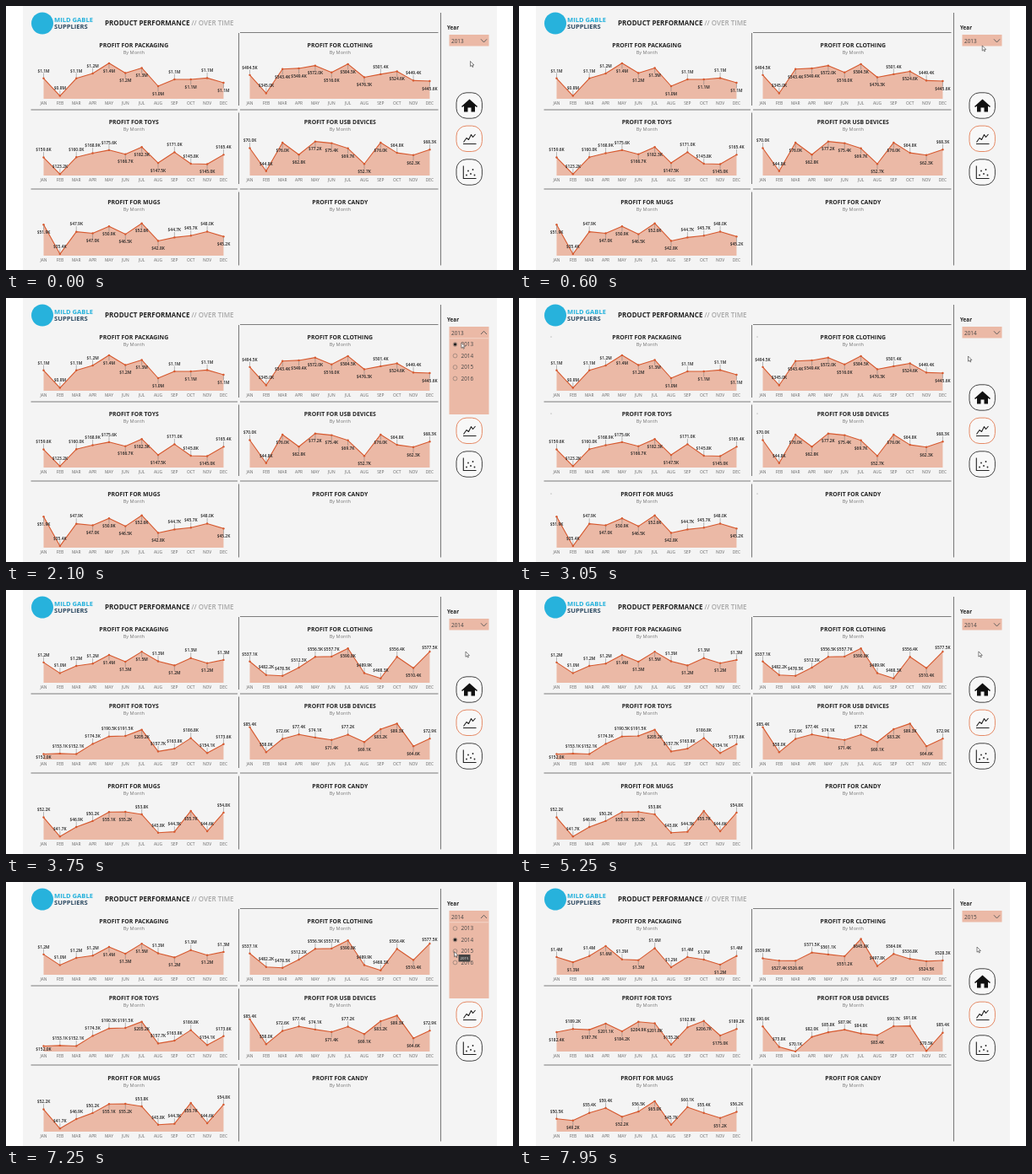
An HTML page that plays this animation: 600 px wide and 313 px high, repeating every 8000 ms.

```html
<!DOCTYPE html>
<html lang="en">
<head>
<meta charset="utf-8">
<title>Product performance</title>
<style>
html, body { margin: 0; width: 100%; height: 100%; overflow: hidden; background: #fff; }
svg { display: block; width: 100vw; height: 100vh; font-family: "Open Sans", "Noto Sans", sans-serif; }
.b { font-weight: 700; }
.mid { text-anchor: middle; }
.val { font-size: 4.9px; font-weight: 600; fill: #222; text-anchor: middle; }
.axis { font-size: 4.9px; fill: #666; text-anchor: middle; }
.icon { fill: none; stroke: #222; stroke-width: 1.1; stroke-linejoin: round; }
</style>
</head>
<body>
<svg id="stage" viewBox="0 0 600 313"></svg>
<script>
const LOOP = 8000;
const FILL = '#ebb9a6', LINE = '#d6592f', RULE = '#7d7d7d', INK = '#222';
const MONTHS = 'JAN FEB MAR APR MAY JUN JUL AUG SEP OCT NOV DEC'.split(' ');
const NAMES = ['PACKAGING', 'CLOTHING', 'TOYS', 'USB DEVICES', 'MUGS', 'CANDY'];
const ROWS = [0, 91, 186];
const X0 = 44.5, STEP = 19.36, COL = 244, BASE = 110, HEIGHT = 43.4;

// One row per chart: axis low, axis high, monthly values. A negative value puts its label below.
const Y2013 = [
  [.75, 1.45, 1.14, .806, 1.14, 1.235, -1.43, -1.243, -1.34, -.992, 1.12, -1.12, 1.147, -1.057],
  [300, 600, 494.5, 345, -543.4, -549.4, -572, -516, -584.5, -476.3, 501.4, -524.6, 449.4, -445.6],
  [120, 200, 159.6, 123.2, 160, 168.9, 175.6, -166.7, -182.3, -147.5, 171, 145.8, -145, 165.4],
  [40, 80, 70, 44.8, -76, -62.8, -77.2, -75.4, -69.7, -52.7, -76, 64.8, -62.3, 68.3],
  [34.5, 55, -51.9, 35.4, 47.9, -47, -50.9, -46.5, -52.6, -42.8, 44.7, 45.7, 48, -45.2]
];
const Y2014 = [
  [.8, 1.6, 1.245, 1.01, 1.17, 1.22, -1.41, -1.26, -1.48, 1.27, -1.18, 1.34, -1.23, 1.3],
  [450, 600, 537.1, 482.2, 478.5, 512.3, 556.5, 557.7, -590.8, 489.9, 468.3, 556.4, -510.4, 577.5],
  [140, 220, -152, 153.1, 152.1, 174.3, 190.5, 191.5, -205.2, 157.7, 163.8, 186.8, 154.1, 173.6],
  [50, 90, 85.4, 58, 72.6, 77.4, 74.1, -71.4, 77.2, -69.1, -83.2, -89.3, -64.6, 72.9],
  [40, 60, 52.2, 41.7, 46.9, 50.2, -55.1, -55.2, 53.8, 43.8, 44.3, -55.7, 44.6, 54.8]
];
const Y2015 = [
  [1.05, 1.75, 1.39, -1.29, 1.41, -1.6, 1.345, -1.33, 1.56, 1.195, 1.39, 1.34, -1.245, 1.41],
  [450, 650, 539.9, -527.4, -526.6, 571.5, 561.1, -551.2, -645.8, 497.8, 564, 536.8, -524.5, 528.3],
  [140, 220, -182.4, 189.2, -187.7, -201.1, -184.2, -204.9, -201.8, 155.2, 192.8, -206.7, -175, 189.2],
  [70, 100, 90.6, 73.8, 70.1, 82, 85.8, 87.9, 84.8, -83.4, 90.7, 91, 70.5, 85.4],
  [40, 70, 50.5, -49.2, 55.4, 59.4, -52.2, 56.5, -65, 45.7, 60.1, 55.4, -51.2, 56.2]
];
const YEARS = [Y2013, Y2014, Y2015];

// Year choices: the click, then the charts follow.
const PICKS = [
  { click: 2750, from: 3200, to: 3450 },
  { click: 7450, from: 7650, to: 7880 }
];
const MENU = [[1660, 2800], [6250, 7500]];
const TIP = [7100, 7450];
// Pointer stops: time, x, y
const POINTER = [
  [0, 549.5, 65.5], [50, 549.5, 65.5], [800, 548, 43], [1600, 545.5, 40], [1750, 545, 41],
  [2500, 531.5, 68], [3100, 531.5, 69], [3700, 544, 73], [4050, 544, 74],
  [5200, 544, 74], [5650, 541.5, 43], [6400, 541.5, 43], [7000, 530.5, 82],
  [7450, 530.5, 83], [7900, 542, 77], [8000, 542, 77]
];

const stage = document.getElementById('stage');
const clamp = (v, a, b) => Math.min(b, Math.max(a, v));
const lerp = (a, b, k) => a + (b - a) * k;
const ease = k => k * k * (3 - 2 * k);
const within = (t, [a, b]) => t >= a && t < b;
const show = (node, on) => node.setAttribute('display', on ? 'inline' : 'none');

function add(tag, attrs, parent = stage) {
  const node = document.createElementNS('http://www.w3.org/2000/svg', tag);
  for (const key in attrs) node.setAttribute(key, attrs[key]);
  return parent.appendChild(node);
}
function text(str, x, y, attrs, parent) {
  const node = add('text', { x, y, ...attrs }, parent);
  node.textContent = str;
  return node;
}
const path = (d, attrs, parent) => add('path', { d, ...attrs }, parent);

function buildPage() {
  add('rect', { x: 20, width: 561, height: 313, fill: '#f4f4f4' });
  add('circle', { cx: 43, cy: 20.5, r: 13, fill: '#27b2dc' });
  text('MILD GABLE', 57, 19.2, { class: 'b', 'font-size': 7.6, fill: '#1fb0dc' });
  text('SUPPLIERS', 57, 27, { class: 'b', 'font-size': 7.6, fill: '#2d4a62' });
  text('PRODUCT PERFORMANCE', 117, 23.4, { class: 'b', 'font-size': 8, fill: INK });
  text('// OVER TIME', 219.5, 23.4, { 'font-weight': 600, 'font-size': 8, fill: '#a6a6a6' });
  path('M29.5 123H274M277 123H511.5M29.5 217H274M277 217H511.5M277 31.5H511.5' +
    'M275.5 32V118M275.5 126.5V211M275.5 220.5V307.5M514.5 8V307.5',
    { stroke: RULE, 'stroke-width': 1.1 });
  text('Year', 522, 27.8, { class: 'b', 'font-size': 6.3, fill: INK });
}

function buildButtons() {
  [118, 157.3, 197].forEach((y, i) => add('rect', {
    x: 533, y: y - 15.2, width: 30.4, height: 30.4, rx: 12,
    fill: '#f8f8f8', stroke: i === 1 ? '#e58a66' : '#444', 'stroke-width': 1
  }));
  path('M539 119L548.5 110.5 558 119 557 120 555 118.4V125.5H550.5V120.5H546.5V125.5H542V118.4L540 120Z', { fill: '#111' });
  path('M541 163.5H556.5M541.5 161.5L545 156.5 547.5 158.5 550.5 152.5 552.5 155.5 555.5 152', { class: 'icon' });
  path('M541.3 189.5V204.5H556.5', { class: 'icon' });
  for (const [x, y] of [[545, 200.5], [547, 195.5], [550, 199], [552.5, 194], [554.5, 200.5]])
    add('circle', { cx: x, cy: y, r: .9, fill: INK });
}

function buildChart(name, i) {
  const dx = (i % 2) * COL, dy = ROWS[i >> 1];
  const g = add('g', { transform: `translate(${dx} ${dy})` });
  text('PROFIT FOR ' + name, 151.3, 49, { class: 'b mid', 'font-size': 6.9, fill: INK }, g);
  text('By Month', 151.3, 57, { class: 'mid', 'font-size': 5.6, fill: '#777' }, g);
  const chart = { spin: add('circle', { cx: 38, cy: 46, r: .55, fill: '#888' }, g) };
  if (name === 'CANDY') return chart;
  chart.area = path('', { fill: FILL }, g);
  chart.leads = path('', { stroke: '#777', 'stroke-width': .5 }, g);
  chart.line = path('', { fill: 'none', stroke: LINE, 'stroke-width': 1.1, 'stroke-linejoin': 'round' }, g);
  chart.dots = MONTHS.map((m, j) => add('circle', { cx: X0 + j * STEP, r: 1.2, fill: LINE }, g));
  chart.labels = MONTHS.map((m, j) => {
    text(m, X0 + j * STEP, BASE + 7, { class: 'axis' }, g);
    return text('', X0 + j * STEP, 0, { class: 'val' }, g);
  });
  return chart;
}

function radio(y, year, parent) {
  add('circle', { cx: 531.5, cy: y, r: 2.4, fill: 'none', stroke: '#8d7a72', 'stroke-width': .7 }, parent);
  text(year, 538.5, y + 2.4, { 'font-size': 6.4, fill: '#444' }, parent);
  return add('circle', { cx: 531.5, cy: y, r: 1.7, fill: INK }, parent);
}

function buildSlicer() {
  const box = add('rect', { x: 524.5, y: 34, width: 47, fill: FILL });
  const year = text('', 527, 43.8, { 'font-size': 6.4, fill: '#444' });
  const arrow = path('', { fill: 'none', stroke: '#555', 'stroke-width': .9 });
  const menu = add('g', {});
  path('M525 47.8H571', { stroke: '#f6ded5', 'stroke-width': .8 }, menu);
  const marks = [2013, 2014, 2015, 2016].map((y, i) => radio(55 + i * 13.5, y, menu));
  const tip = add('g', {});
  add('rect', { x: 535.5, y: 86, width: 14, height: 8.5, fill: '#444' }, tip);
  text('2015', 542.5, 91.9, { class: 'mid', 'font-size': 4.3, fill: '#fff' }, tip);
  return { box, year, arrow, menu, marks, tip };
}

buildPage();
buildButtons();
const charts = NAMES.map(buildChart);
const slicer = buildSlicer();
const pointer = path('M0 0V6.2L1.5 4.9 2.5 7 3.4 6.6 2.5 4.6 4.4 4.5Z',
  { fill: '#fff', stroke: '#333', 'stroke-width': .6 });

function heights([lo, hi, ...values]) {
  return values.map(v => BASE - (Math.abs(v) - lo) / (hi - lo) * HEIGHT);
}

function drawChart(chart, i, from, to, k) {
  const a = heights(YEARS[from][i]), b = heights(YEARS[to][i]);
  const values = YEARS[k > 0 ? to : from][i].slice(2);
  const ys = a.map((y, j) => lerp(y, b[j], k));
  const d = 'M' + ys.map((y, j) => `${X0 + j * STEP} ${y}`).join('L');
  chart.line.setAttribute('d', d);
  chart.area.setAttribute('d', `${d}V${BASE}H${X0}Z`);
  let leads = '';
  ys.forEach((y, j) => {
    const side = values[j] < 0 ? 1 : -1;
    const ly = clamp(y + side * 9, 68.5, BASE - 3);
    const label = chart.labels[j];
    label.setAttribute('y', ly + 1.75);
    label.textContent = '$' + Math.abs(values[j]).toFixed(1) + (i ? 'K' : 'M');
    chart.dots[j].setAttribute('cy', y);
    if (Math.abs(ly - y) > 4) leads += `M${X0 + j * STEP} ${y}V${ly - side * 2.6}`;
  });
  chart.leads.setAttribute('d', leads);
}

function drawSlicer(t, chosen) {
  const open = MENU.some(span => within(t, span));
  slicer.box.setAttribute('height', open ? 104 : 13.5);
  slicer.year.textContent = 2013 + chosen;
  slicer.arrow.setAttribute('d', open ? 'M562 43L565.5 39.3 569 43' : 'M562 39.3L565.5 43 569 39.3');
  show(slicer.menu, open);
  slicer.marks.forEach((m, i) => show(m, i === chosen));
  show(slicer.tip, within(t, TIP));
}

function drawPointer(t) {
  const n = POINTER.findIndex(p => p[0] > t);
  const [t0, x0, y0] = POINTER[n - 1], [t1, x1, y1] = POINTER[n];
  const k = ease((t - t0) / (t1 - t0));
  pointer.setAttribute('transform', `translate(${lerp(x0, x1, k)} ${lerp(y0, y1, k)})`);
}

function draw(t) {
  const chosen = PICKS.filter(p => t >= p.click).length;
  const to = PICKS.filter(p => t >= p.from).length;
  const move = PICKS[to - 1];
  const k = move ? ease(clamp((t - move.from) / (move.to - move.from), 0, 1)) : 0;
  const busy = PICKS.some(p => within(t, [p.click + 100, p.from]));
  charts.forEach((chart, i) => {
    show(chart.spin, busy);
    if (chart.line) drawChart(chart, i, Math.max(0, to - 1), to, k);
  });
  drawSlicer(t, chosen);
  drawPointer(t);
}

function tick() {
  draw(performance.now() % LOOP);
  requestAnimationFrame(tick);
}
tick();
</script>
</body>
</html>
```
